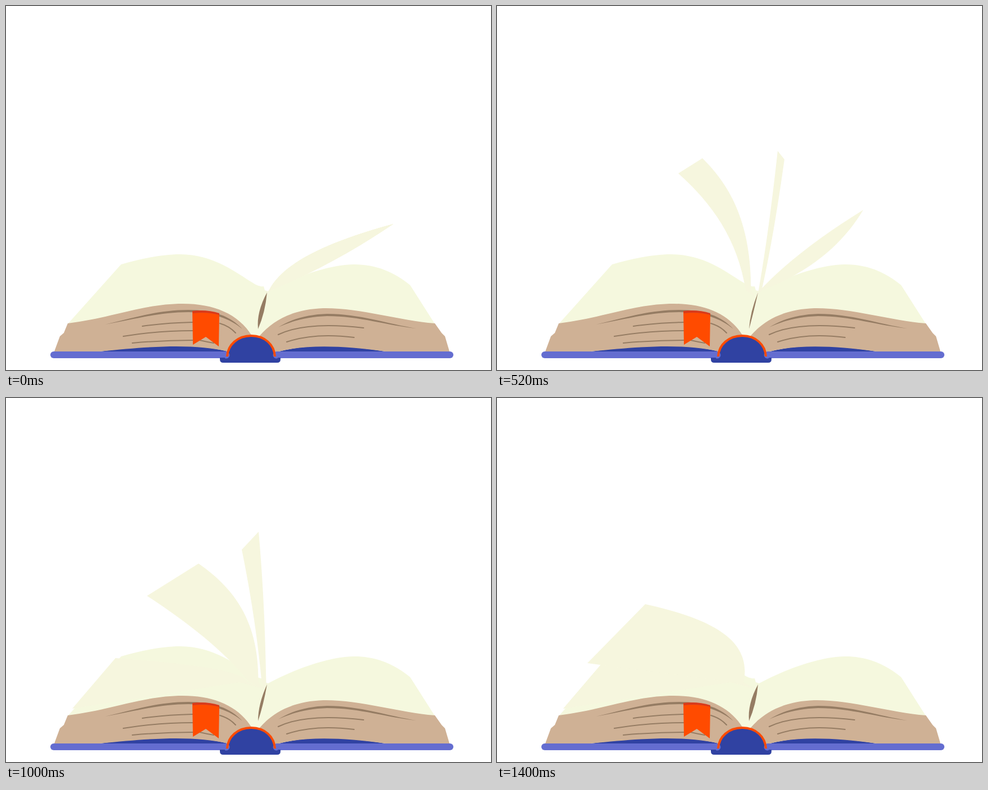
Write an HTML page that moves like this. It is 864 px wide and 648 px high and loops after 1.44 s.

```html
<!DOCTYPE html>
<html lang="en">
<head>
<meta charset="utf-8">
<title>Turning pages</title>
<style>
  html, body { margin: 0; width: 100%; height: 100%; overflow: hidden; background: #fff; }
  svg { display: block; width: 100%; height: 100%; }
  .paper { fill: #f5f8de; }
  .leaf { fill: #f6f6de; }
  .edge { fill: #cfb195; }
  .crease { fill: #957c63; }
  .line { fill: none; stroke: #957c63; stroke-width: 2; stroke-linecap: round; }
  .cover { fill: #646dd0; }
  .spine { fill: #3042a2; }
  .tape { fill: #ff4b00; }
</style>
</head>
<body>
<svg viewBox="0 0 864 648">
  <path class="paper" d="M110 566 L205 460 C240 450 278 442 310 442 C370 442 410 475 440 493 C447 498 455 500 459 499 L461 506 L467 508 C510 485 570 461 620 460 C660 460 692 474 720 497 L764 566 L640 560 L452 588 H438 L310 550 Z"/>
  <g id="leaves"></g>
  <path id="gutter" class="crease"/>

  <path class="spine" d="M167 615 C270 602 340 601 395 615 Z M486 615 C540 601 600 603 676 615 Z"/>
  <path class="edge" d="M110 565 C190 555 245 530 315 530 C370 530 414 548 438 587 V615 H395 C340 602 270 604 167 615 H86 L96 588 L103 582 Z"/>
  <path class="edge" d="M764 565 C700 560 630 537 565 538 C510 540 475 560 452 587 V615 H486 C540 602 600 605 676 615 H790 L782 588 L776 582 Z"/>
  <path class="crease" d="M176 567 C230 555 270 541 325 541 C370 541 400 552 421 575 C398 556 370 546 325 545 C270 545 230 558 176 567 Z"/>
  <path class="crease" d="M485 572 C510 556 540 549 572 548 C630 548 680 566 731 574 C680 569 630 552 572 552 C540 553 510 560 485 572 Z"/>
  <path class="line" d="M243 570 Q285 564 333 563 M209 588 Q270 578 333 578 M225 600 Q280 595 333 595 M381 565 Q398 570 409 582 M345 595 Q358 598 370 600 M485 585 C520 568 570 565 637 573 M500 598 Q550 581 620 590"/>

  <path class="tape" d="M332 543 Q358 541 380 549 L379 606 L356 589 L333 603 Z"/>
  <path fill="#d83a1b" d="M332 543 Q358 540 380 547 V550 Q358 544 333 547 Z"/>

  <rect class="cover" x="79" y="615" width="322" height="12" rx="6"/>
  <rect class="cover" x="476" y="615" width="321" height="12" rx="6"/>
  <path class="spine" d="M381 626 H394 C394 604 413 587 437 587 C461 587 479 604 479 626 H489 V629 Q489 635 483 635 H387 Q381 635 381 629 Z"/>
  <path class="cover" d="M390 616 A6 6 0 1 1 390 627 Z M484 616 A6 6 0 1 0 484 627 Z"/>
  <path fill="none" stroke="#ff4b00" stroke-width="4" d="M394 624 C395 603 413 587 437 587 C461 587 478 603 479 624"/>
</svg>
<script>
const LOOP = 1440, STEP = 40;

// Stages of one turn: near tip, far tip, and how much each edge bows.
const stages = [
  [690, 388, 690, 388, .7, -.2],   // resting on the right
  [651, 362, 651, 362, .2, -.6],
  [554, 293, 573, 305, -1, -.7],
  [500, 258, 512, 273, -.2, -.2],  // upright
  [463, 284, 500, 248, 0, -.6],
  [420, 270, 450, 238, .3, .6],
  [323, 298, 366, 271, .7, 1.1],
  [282, 318, 366, 268, .25, 1.1],
  [267, 331, 357, 282, .3, 1.1],
  [161, 472, 264, 367, 0, 1.4],
  [143, 512, 236, 408, 0, 1.7],
  [118, 553, 195, 463, 0, 1]       // resting on the left
];

// For each leaf: the times at which it reaches a stage.
const turns = [
  [[0, 0], [320, 3], [520, 6], [680, 8], [840, 9], [1000, 11]],
  [[0, 0], [320, 1], [520, 3], [680, 4], [840, 6.3], [1160, 10], [1240, 11]],
  [[0, 0], [540, 1], [840, 3], [1160, 7], [1400, 9]]
];

const mix = (a, b, k) => a + (b - a) * k;

function stageAt(turn, t) {
  const i = turn.findIndex(([time]) => time > t);
  if (i < 0) return turn[turn.length - 1][1];
  const [t0, s0] = turn[i - 1], [t1, s1] = turn[i];
  return mix(s0, s1, (t - t0) / (t1 - t0));
}

function poseAt(stage) {
  const i = Math.min(Math.floor(stage), stages.length - 2);
  return stages[i].map((v, n) => mix(v, stages[i + 1][n], stage - i));
}

// Cubic from the spine to a tip; bow > 0 rises first, bow < 0 reaches out first.
function edge(x, y, bow, shift) {
  const rx = 442 + .13 * (Math.min(x, 520) - 300) + shift, ry = 506;
  const at = (u, v) => `${mix(rx, x, u).toFixed(1)} ${mix(ry, y, v).toFixed(1)}`;
  return [
    at(0, 0),
    at(.33 - .3 * bow, .33 + .15 * bow),
    at(.67 - .25 * bow, .67 + .1 * bow),
    at(1, 1)
  ];
}

function outline([nx, ny, fx, fy, nearBow, farBow]) {
  const near = edge(nx, ny, nearBow, -2);
  const far = edge(fx, fy, farBow, 2).reverse();
  return `M${near[0]} C${near.slice(1)} L${far[0]} C${far.slice(1)} L460 518 Z`;
}

const group = document.getElementById('leaves');
const gutter = document.getElementById('gutter');
const leaves = turns.map(() => {
  const leaf = document.createElementNS(group.namespaceURI, 'path');
  leaf.setAttribute('class', 'leaf');
  return group.appendChild(leaf);
});

function draw(t) {
  leaves.forEach((leaf, i) =>
    leaf.setAttribute('d', outline(poseAt(stageAt(turns[i], t)))));
  const gap = 8 * Math.abs(Math.cos(Math.PI * t / 1400));
  gutter.setAttribute('d', `M465 510 Q${454 - gap} 545 449 575 Q${454 + gap} 545 465 510 Z`);
}

const start = performance.now();
function tick() {
  const t = (performance.now() - start) % LOOP;
  draw(Math.floor(t / STEP) * STEP);
  requestAnimationFrame(tick);
}
tick();
</script>
</body>
</html>
```
